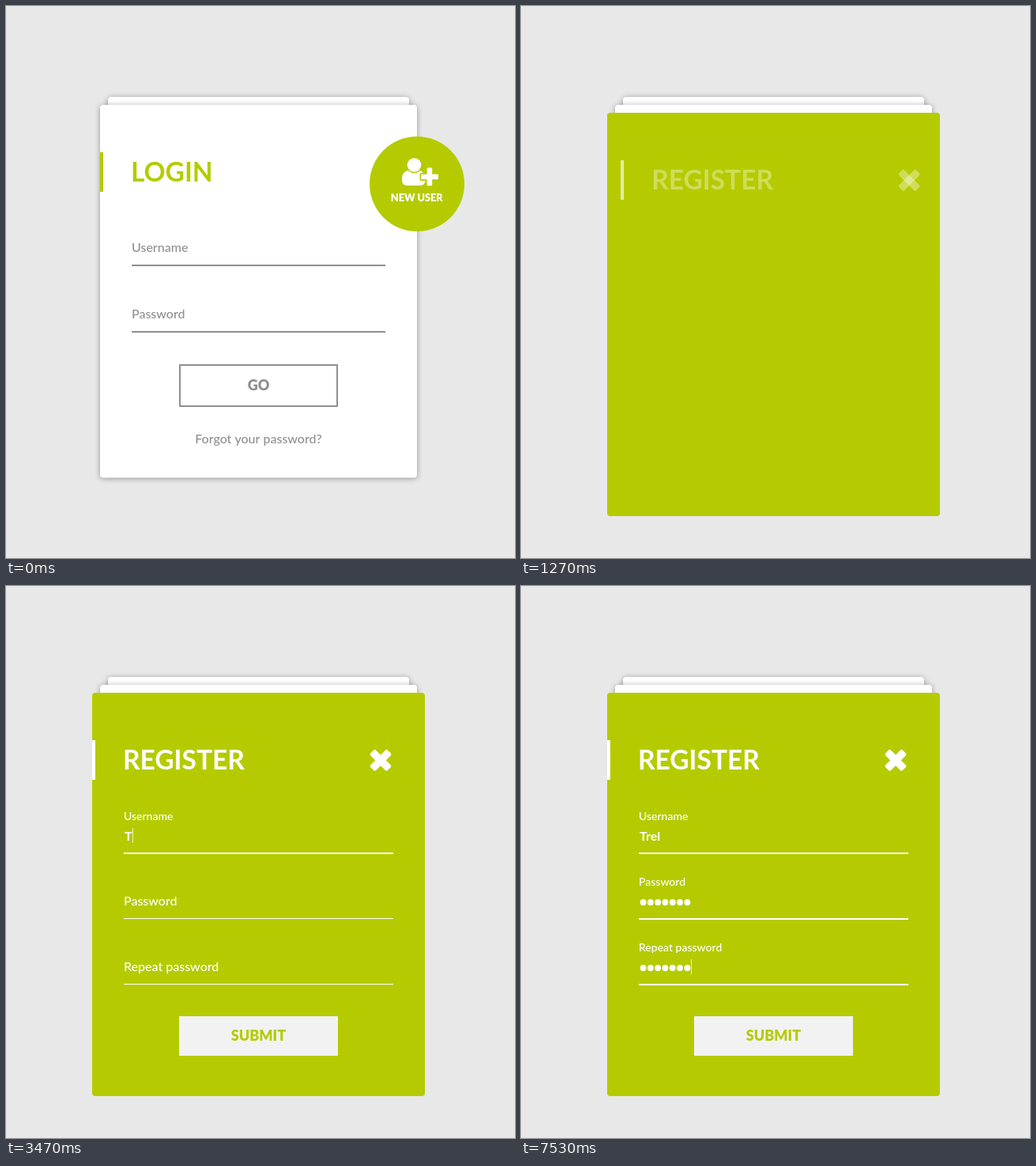
Animation, 644 px wide and 698 px high, one loop 8000 ms. Source, as an HTML page with a canvas:

```html
<!DOCTYPE html>
<html lang="en">
<head>
<meta charset="utf-8">
<title>Login and register</title>
<style>
html, body { margin: 0; width: 100%; height: 100%; overflow: hidden; background: #e8e8e8; }
canvas { display: block; width: 644px; height: 698px; }
</style>
</head>
<body>
<canvas id="stage" width="644" height="698"></canvas>
<script>
const ctx = document.getElementById('stage').getContext('2d');
const LOOP = 8000;
const GREEN = '#b5cb00', GRAY = '#8f8f8f', WHITE = '#fff';
const FLOAT_TIME = 400;

const fields = [
  { label: 'Username', y: 321, line: 337, enter: 1218, focus: 2490, blur: 4030, idle: 3000,
    value: 'Trel', keys: [3470, 3600, 3800, 3870] },
  { label: 'Password', y: 404, line: 420, enter: 1318, focus: 4030, blur: 5880, idle: 4400,
    keys: [4730, 4800, 5000, 5070, 5270, 5600, 5600] },
  { label: 'Repeat password', y: 487, line: 503, enter: 1418, focus: 5880, blur: LOOP, idle: 6270,
    keys: [6600, 6730, 6930, 7000, 7200, 7530, 7530] }
];

const clamp = v => Math.min(1, Math.max(0, v));
const mix = (a, b, p) => a + (b - a) * p;
const bezier = (a, b, s) => 3 * a * s * (1 - s) ** 2 + 3 * b * s * s * (1 - s) + s ** 3;

// The CSS "ease" curve
function ease(x) {
  if (x <= 0 || x >= 1) return clamp(x);
  let lo = 0, hi = 1;
  for (let i = 0; i < 24; i++) {
    const mid = (lo + hi) / 2;
    if (bezier(0.25, 0.25, mid) < x) lo = mid; else hi = mid;
  }
  return bezier(0.1, 1, lo);
}

const progress = (t, start, duration) => ease((t - start) / duration);

function rect(x, y, w, h, color) {
  ctx.fillStyle = color;
  ctx.fillRect(x, y, w, h);
}

function round(x, y, w, h, r, color) {
  ctx.fillStyle = color;
  ctx.beginPath();
  ctx.roundRect(x, y, w, h, r);
  ctx.fill();
}

function disc(x, y, r, color) {
  ctx.fillStyle = color;
  ctx.beginPath();
  ctx.arc(x, y, r, 0, Math.PI * 2);
  ctx.fill();
}

function text(str, x, y, size, weight, color, align = 'left') {
  ctx.font = `${weight} ${size}px Lato, sans-serif`;
  ctx.fillStyle = color;
  ctx.textAlign = align;
  ctx.fillText(str, x, y);
}

function sheet(x, y, w, h) {
  ctx.save();
  ctx.shadowColor = 'rgba(0,0,0,0.36)';
  ctx.shadowBlur = 7;
  ctx.shadowOffsetY = 1;
  round(x, y, w, h, 4, WHITE);
  ctx.restore();
}

function drawLogin() {
  sheet(129, 115, 381, 40);
  sheet(119, 125, 401, 471.5);
  rect(119, 185, 4, 50, GREEN);
  text('LOGIN', 158, 222, 33.5, 700, GREEN);
  text('Username', 159, 311, 16, 500, GRAY);
  rect(159, 327, 321, 2, GRAY);
  text('Password', 159, 395, 16, 500, GRAY);
  rect(159, 411, 321, 2, GRAY);
  ctx.strokeStyle = GRAY;
  ctx.lineWidth = 2;
  ctx.strokeRect(220, 454, 199, 52);
  text('GO', 319.5, 486, 18, 900, GRAY, 'center');
  text('Forgot your password?', 319.5, 553, 16, 500, GRAY, 'center');
}

function drawShape(t) {
  const p = progress(t, 628, 600);
  const x = mix(460, 109, p), y = mix(165, 135, p);
  const w = mix(580, 530, p) - x, h = mix(285, 645, p) - y;
  const r = { x: mix(w / 2, 4, p), y: mix(h / 2, 4, p) };
  round(x, y, w, h, r, GREEN);
}

function drawNewUser(t) {
  ctx.globalAlpha = 1 - clamp((t - 628) / 100);
  if (!ctx.globalAlpha) return;
  round(501, 207.5, 29.5, 19.5, [10, 10, 6, 6], WHITE);
  disc(516.5, 201, 10.3, GREEN);
  disc(516.5, 201, 8.8, WHITE);
  round(523.5, 211, 25, 10, 2, GREEN);
  round(531, 203, 10, 26, 2, GREEN);
  round(525, 212.7, 22, 6.6, 1.2, WHITE);
  round(532.6, 204.5, 6.6, 22.7, 1.2, WHITE);
  text('NEW USER', 519.7, 247, 12.7, 900, WHITE, 'center');
}

function drawCross(x, y) {
  ctx.save();
  ctx.translate(x, y);
  ctx.rotate(Math.PI / 4);
  round(-15.3, -4.8, 30.6, 9.6, 2.2, WHITE);
  round(-4.8, -15.3, 9.6, 30.6, 2.2, WHITE);
  ctx.restore();
}

function drawTitle(t) {
  const p = progress(t, 1118, 400), shift = 50 * (1 - p);
  ctx.globalAlpha = p;
  rect(109 + shift, 195, 4, 50, WHITE);
  ctx.globalAlpha = p ** 2.5;
  text('REGISTER', 148 + shift, 232, 33.5, 700, WHITE);
  drawCross(474 + shift, 220.3);
}

function drawValue(f, t) {
  const count = f.keys.filter(k => t >= k).length;
  let end = 150;
  if (f.value) {
    const typed = f.value.slice(0, count);
    text(typed, 150, f.y + 1, 16, 700, WHITE);
    end += ctx.measureText(typed).width;
  } else {
    for (let i = 0; i < count; i++) disc(154.6 + 9.3 * i, f.y - 4, 3.9, WHITE);
    end += 9.35 * count;
  }
  const focused = t >= f.focus && t < f.blur;
  if (focused && (count || t < f.idle)) {
    rect(Math.round(end), f.y - 15, 1, 19, 'rgba(255,255,255,0.75)');
  }
}

function drawField(f, t) {
  const enter = progress(t, f.enter, 400);
  if (!enter) return;
  const up = progress(t, f.focus, FLOAT_TIME);
  ctx.save();
  ctx.globalAlpha = enter ** 2.5;
  ctx.translate(50 * (1 - enter), 0);
  text(f.label, 149, mix(f.y, f.y - 25, up), mix(16, 14, up), 500, WHITE);
  rect(149, f.line, 341, 1, WHITE);
  const half = 170.5 * up;
  rect(319.5 - half, f.line, half * 2, 2, WHITE);
  drawValue(f, t);
  ctx.restore();
}

function drawSubmit(t) {
  ctx.globalAlpha = progress(t, 1518, 400);
  rect(219, 544, 201, 50, '#f2f2f2');
  text('SUBMIT', 319.5, 575, 18, 900, GREEN, 'center');
}

function draw(t) {
  ctx.globalAlpha = 1;
  rect(0, 0, 644, 698, '#e8e8e8');
  drawLogin();
  drawShape(t);
  drawNewUser(t);
  drawTitle(t);
  for (const f of fields) drawField(f, t);
  drawSubmit(t);
}

const start = performance.now();
function tick() {
  draw((performance.now() - start) % LOOP);
  requestAnimationFrame(tick);
}
tick();
</script>
</body>
</html>
```
